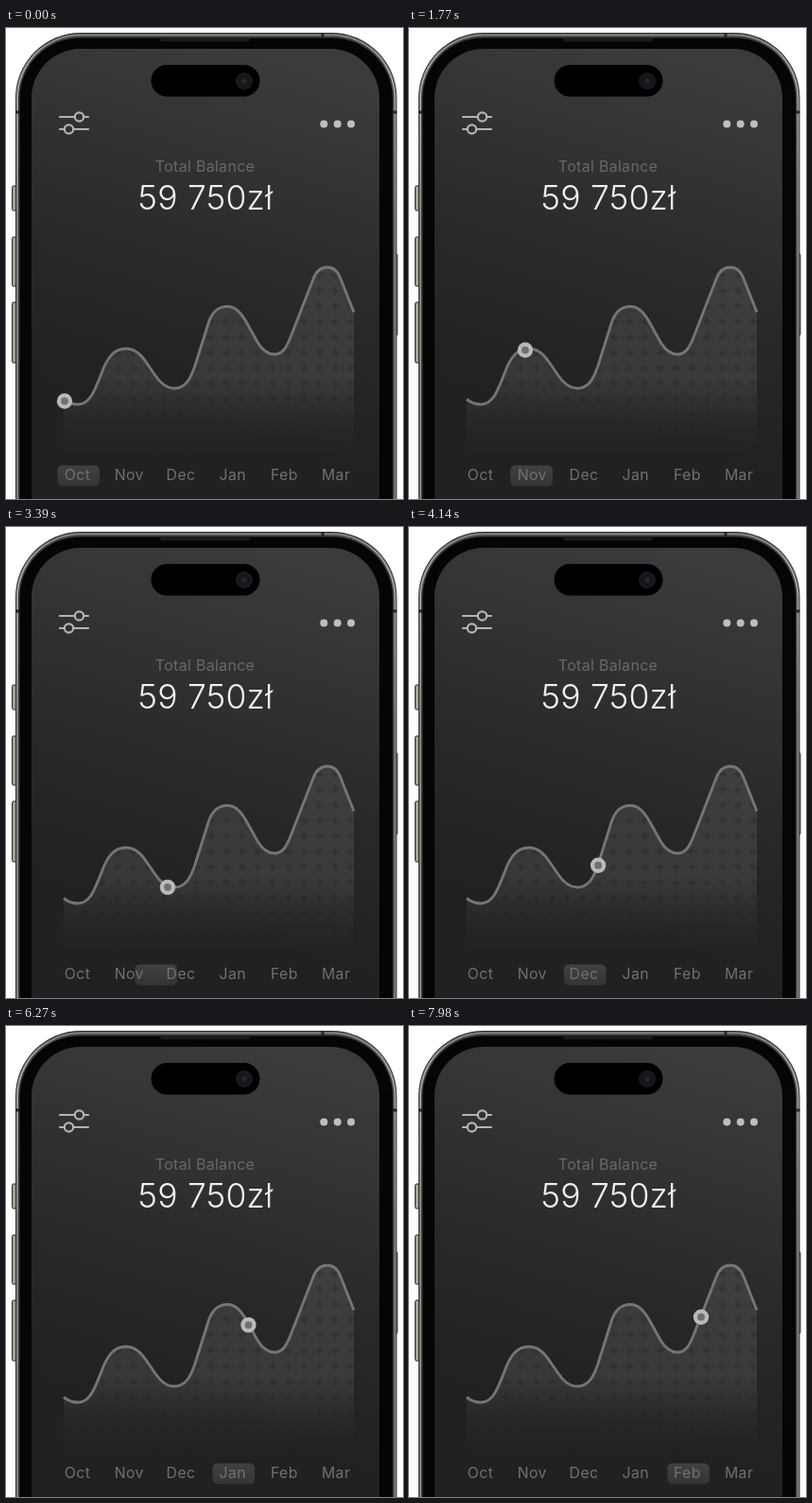
Write an HTML page that moves like this. It is 420 px wide and 498 px high and loops after 8 s.

```html
<!DOCTYPE html>
<html lang="en">
<head>
<meta charset="utf-8">
<title>Balance chart</title>
<style>
  html, body { margin: 0; width: 100%; height: 100%; overflow: hidden; background: #fff; }
  svg { display: block; width: 420px; height: 498px; }
  text { font-family: Inter, "Open Sans", sans-serif; text-anchor: middle; }
  .label { font-size: 16px; letter-spacing: .3px; fill: #68686b; }
  .amount { font-size: 35.5px; font-weight: 300; letter-spacing: .2px; fill: #f0f0f0; }
  .month { font-size: 15.8px; letter-spacing: .4px; fill: #707073; }
</style>
</head>
<body>
<svg viewBox="0 0 420 498">
  <defs>
    <linearGradient id="metal" gradientUnits="userSpaceOnUse" x1="0" y1="5" x2="0" y2="200">
      <stop offset="0" stop-color="#7c7f75"/>
      <stop offset=".2" stop-color="#a2a59b"/>
      <stop offset="1" stop-color="#83867c"/>
    </linearGradient>
    <linearGradient id="screen" gradientUnits="userSpaceOnUse" x1="250" y1="20" x2="140" y2="400">
      <stop offset="0" stop-color="#3b3b3d"/>
      <stop offset=".35" stop-color="#313134"/>
      <stop offset=".68" stop-color="#27272a"/>
      <stop offset="1" stop-color="#212124"/>
    </linearGradient>
    <linearGradient id="fade" gradientUnits="userSpaceOnUse" x1="0" y1="250" x2="0" y2="450">
      <stop offset="0" stop-color="#fff" stop-opacity=".09"/>
      <stop offset=".6" stop-color="#fff" stop-opacity=".1"/>
      <stop offset=".82" stop-color="#fff" stop-opacity=".03"/>
      <stop offset="1" stop-color="#fff" stop-opacity="0"/>
    </linearGradient>
    <linearGradient id="pillFill" x1="0" x2="0" y1="0" y2="1">
      <stop offset="0" stop-color="#414144"/>
      <stop offset="1" stop-color="#343437"/>
    </linearGradient>
    <radialGradient id="lens">
      <stop offset="0" stop-color="#2a2c36"/>
      <stop offset=".5" stop-color="#14151b"/>
      <stop offset="1" stop-color="#1a1b20"/>
    </radialGradient>
    <pattern id="plus" width="16.4" height="16.4" x="61" y="253" patternUnits="userSpaceOnUse">
      <path d="M8.2 4v8.4M4 8.2h8.4" stroke="#222226" stroke-opacity=".38" stroke-width="2.2"/>
    </pattern>
  </defs>

  <!-- phone body -->
  <g fill="#a0a298" stroke="#2a2b27">
    <rect x="6.5" y="167" width="6" height="26" rx="1.5"/>
    <rect x="6.5" y="221" width="6" height="52" rx="1.5"/>
    <rect x="6.5" y="290" width="6" height="64" rx="1.5"/>
    <rect x="411" y="239" width="3" height="86" rx="1"/>
  </g>
  <rect x="10" y="5" width="403.500" height="600" rx="69" fill="#2d2f29"/>
  <rect x="11" y="6.200" width="401.500" height="600" rx="68" fill="url(#metal)"/>
  <rect x="13" y="8.500" width="397.500" height="600" rx="66" fill="#3c3e37"/>
  <path d="M10 89h5M408 89h5.500M335 5v5" stroke="#25261f" stroke-width="3"/>
  <rect x="14.500" y="10.500" width="394.500" height="600" rx="64" fill="#050506"/>
  <rect x="163" y="10.800" width="95" height="3.400" rx="1.700" fill="#1b1c1a"/>
  <rect x="27" y="22" width="368" height="600" rx="52" fill="url(#screen)"/>
  <rect x="153.500" y="39" width="115" height="33.500" rx="16.750" fill="#000"/>
  <circle cx="252" cy="56" r="9" fill="url(#lens)"/>

  <!-- header -->
  <g fill="none" stroke="#b4b4b5" stroke-width="2.200" stroke-linecap="round">
    <path d="M57 94h15.500M82.500 94h4.500M57 107h4.500M71.500 107h15.500"/>
    <circle cx="77.500" cy="94" r="4.700"/>
    <circle cx="66.500" cy="107" r="4.700"/>
  </g>
  <g fill="#bebebf">
    <circle cx="336.300" cy="101.600" r="4"/>
    <circle cx="350.700" cy="101.600" r="4"/>
    <circle cx="365" cy="101.600" r="4"/>
  </g>
  <text class="label" x="210.500" y="151.500">Total Balance</text>
  <text class="amount" x="211" y="192">59 750zł</text>

  <!-- chart -->
  <path id="area" fill="url(#fade)"/>
  <path id="texture" fill="url(#plus)"/>
  <path id="line" fill="none" stroke="#757578" stroke-width="2.900" d="M61 392.500 C66 396.500 71 398 76 398 C89 398 94 383 101.500 364 C107 349 114 339 127 339 C136 339 142 344 148 353 L158 367.500 C163 375 169 381 178 381 C190 381 195 371 199.500 358.500 L214 312.500 C218 300 224 294.500 234 294.500 C243 294.500 249 301 256 314 L266 332 C270.500 339.500 276 345 284 345 C293 345 297 337 301 327 L325 265.500 C328 257 333 253 340 253 C347 253 351 257 354 265 L368 300.500"/>

  <!-- months -->
  <rect id="pill" x="54.500" y="462.500" width="44.500" height="22" rx="5" fill="url(#pillFill)"/>
  <g id="months"></g>

  <g id="dot">
    <circle r="8.200" fill="#b9b9bb"/>
    <circle r="3.900" fill="#707073"/>
  </g>
</svg>
<script>
  const LOOP = 8000;
  const MONTH_STEP = 54.7;
  const SLIDE_MS = 450;
  const DOT_DROP = 1.2;
  const slideStarts = [1410, 3165, 4920, 6675];
  // [time in ms, x on the curve]
  const stops = [
    [0, 62], [810, 94.5], [1110, 101.5], [1620, 117], [2490, 148], [3240, 165.5],
    [3390, 171], [4065, 198.5], [4920, 216], [5685, 244.5], [6270, 256.5],
    [6480, 260.5], [7275, 288.5], [7980, 309], [LOOP, 309.4]
  ];

  const byId = id => document.getElementById(id);
  const line = byId('line'), dot = byId('dot'), pill = byId('pill');

  const areaPath = line.getAttribute('d') + ' V450 H61 Z';
  byId('area').setAttribute('d', areaPath);
  byId('texture').setAttribute('d', areaPath);

  byId('months').innerHTML = ['Oct', 'Nov', 'Dec', 'Jan', 'Feb', 'Mar']
    .map((name, i) => `<text class="month" x="${75.6 + i * MONTH_STEP}" y="478">${name}</text>`)
    .join('');

  function lengthAtX(x) {
    let low = 0, high = line.getTotalLength();
    for (let i = 0; i < 24; i++) {
      const mid = (low + high) / 2;
      if (line.getPointAtLength(mid).x < x) low = mid; else high = mid;
    }
    return low;
  }

  const track = stops.map(([time, x]) => [time, lengthAtX(x)]);

  function distanceAt(time) {
    const i = track.findIndex(([end]) => end > time);
    const [t0, d0] = track[i - 1], [t1, d1] = track[i];
    return d0 + (d1 - d0) * (time - t0) / (t1 - t0);
  }

  function easeInOut(p) {
    p = Math.min(1, Math.max(0, p));
    return p < .5 ? 4 * p ** 3 : 1 - 4 * (1 - p) ** 3;
  }

  let start;
  function draw(now) {
    start ??= now;
    const time = (now - start) % LOOP;
    const { x, y } = line.getPointAtLength(distanceAt(time));
    const month = slideStarts.reduce((sum, t) => sum + easeInOut((time - t) / SLIDE_MS), 0);
    dot.setAttribute('transform', `translate(${x} ${y + DOT_DROP})`);
    pill.setAttribute('transform', `translate(${month * MONTH_STEP} 0)`);
    requestAnimationFrame(draw);
  }
  requestAnimationFrame(draw);
</script>
</body>
</html>
```
